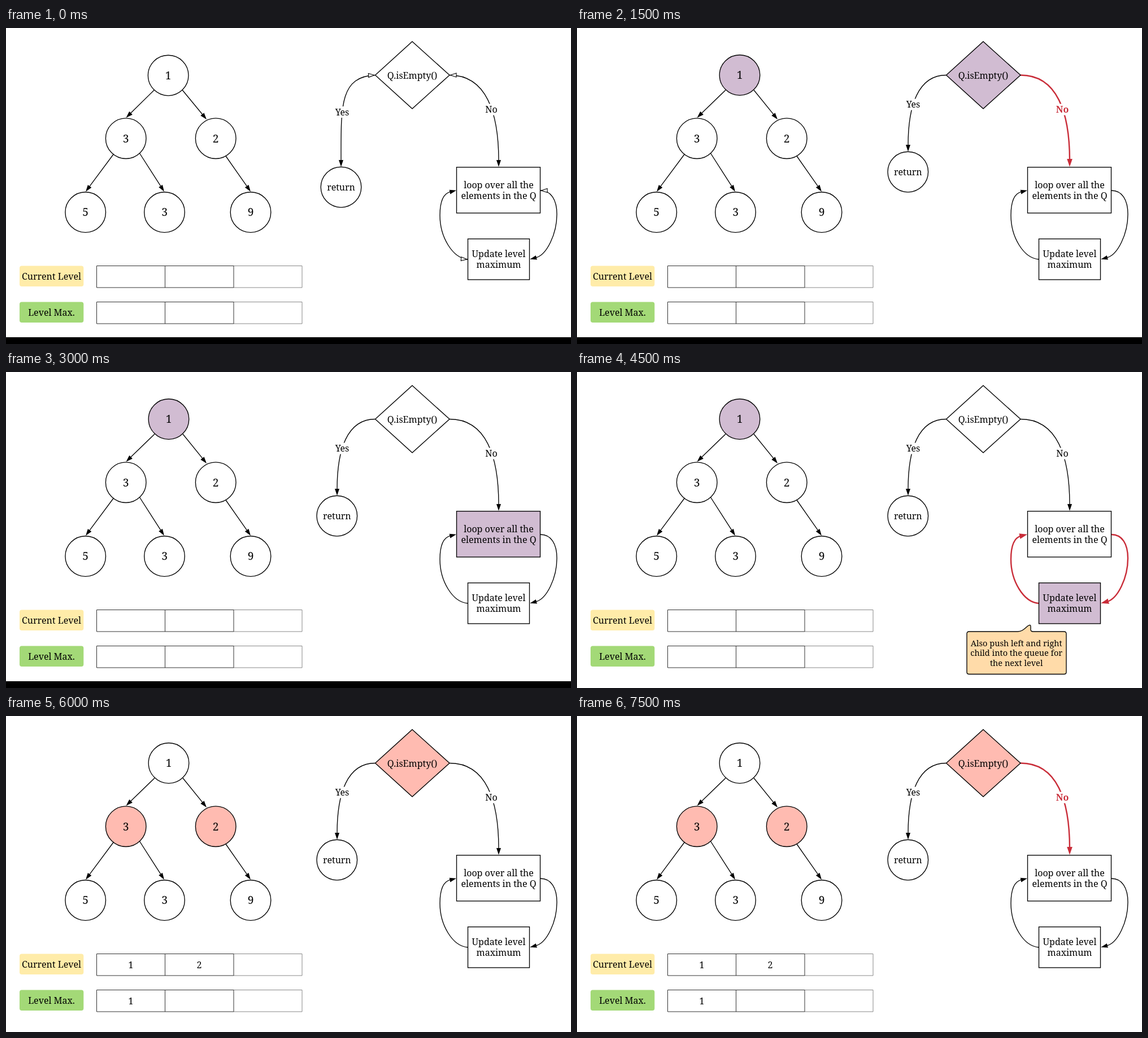
Animation, 1000 px wide and 560 px high, one loop 8000 ms. Source, as an HTML page:

```html
<!DOCTYPE html>
<html lang="en">
<head>
<meta charset="utf-8">
<title>Level maximum of a binary tree</title>
<style>
html, body { margin: 0; width: 100%; height: 100%; overflow: hidden; background: #fff; }
svg { display: block; width: 100%; height: 100%; }
text { font-family: "Noto Serif", "DejaVu Serif", serif; text-anchor: middle; }
.line { stroke: #000; stroke-width: 1.35; }
.hot { stroke: #c92d39; stroke-width: 2.4; }
</style>
</head>
<body>
<svg viewBox="0 0 1000 560">
  <defs>
    <marker id="tip" markerUnits="userSpaceOnUse" markerWidth="14" markerHeight="10" refX="1" refY="5" orient="auto">
      <path d="M0 1L12 5L0 9Z"/>
    </marker>
    <marker id="hotTip" markerUnits="userSpaceOnUse" markerWidth="16" markerHeight="12" refX="3" refY="6" orient="auto">
      <path d="M0 1.2L14 6L0 10.8Z" fill="#c92d39"/>
    </marker>
    <marker id="openTip" markerUnits="userSpaceOnUse" markerWidth="16" markerHeight="12" refX="14" refY="6" orient="auto-start-reverse">
      <path d="M2 2.6L12.5 6L2 9.4Z" fill="#fff" stroke="#000" stroke-width="1.1"/>
    </marker>
  </defs>
  <g id="scene"></g>
</svg>
<script>
const LOOP = 8000, STEP = 1500;
const WHITE = "#fff", PURPLE = "#d1bcd2", PINK = "#ffbbb1", RED = "#c92d39";

// What is highlighted during each step
const steps = [
  { intro: true, bar: true },
  { root: PURPLE, test: PURPLE, no: true, bar: true },
  { root: PURPLE, loop: PURPLE, bar: true },
  { root: PURPLE, update: PURPLE, cycle: true, note: true },
  { level: PINK, test: PINK, filled: true },
  { level: PINK, test: PINK, filled: true, no: true }
];

const text = (s, x, y, size = 16, extra = "") =>
  `<text x="${x}" y="${y + size * 0.357}" font-size="${size}" ${extra}>${s}</text>`;

const node = (label, x, y, fill = WHITE, size = 19.2) =>
  `<circle class="line" cx="${x}" cy="${y}" r="35.8" fill="${fill}"/>` + text(label, x, y, size);

const box = (x, y, w, h, fill = WHITE) =>
  `<rect class="line" x="${x}" y="${y}" width="${w}" height="${h}" fill="${fill}"/>`;

const link = (d, hot, open) =>
  `<path class="${hot ? "hot" : "line"}" d="${d}" fill="none" marker-end="url(#${hot ? "hotTip" : "tip"})"` +
  `${open ? ' marker-start="url(#openTip)"' : ""}/>`;

function edge(x1, y1, x2, y2) {
  const k = 1 - 11 / Math.hypot(x2 - x1, y2 - y1);
  return link(`M${x1} ${y1}L${x1 + (x2 - x1) * k} ${y1 + (y2 - y1) * k}`);
}

const linkLabel = (s, x, y, hot) =>
  `<rect x="${x - 13}" y="${y - 10}" width="26" height="20" fill="#fff"/>` +
  text(s, x, y, 16, hot ? `fill="${RED}" font-weight="700"` : "");

function tree(s) {
  const x = s.intro ? 287.2 : 288, y = s.intro ? 84 : 83.5;
  return edge(x - 25, 110, 212.5, 159) + edge(x + 25, 110, 355, 162) +
    edge(190, 224, 141, 290) + edge(236.5, 222, 280, 290) + edge(389, 227, 433, 290) +
    node(1, x, y, s.root) +
    node(3, 212.2, 195.7, s.level) + node(2, 371.2, 195.7, s.level) +
    node(5, 140.7, 326.5) + node(3, 280.5, 326.5) + node(9, 433, 326.5);
}

function row(label, color, y, values) {
  let out = `<rect x="24" y="${y}" width="113.3" height="36.5" rx="4" fill="${color}"/>` + text(label, 80.5, y + 18.3);
  out += `<g fill="none" stroke-width="1"><path stroke="#888" d="M403 ${y}H524V${y + 38.5}H403"/>` +
    `<path stroke="#333" d="M403 ${y}H160.5V${y + 38.5}H403V${y}M281.5 ${y}v38.5"/></g>`;
  return out + values.map((v, i) => text(v, 221 + 121 * i, y + 19.3)).join("");
}

function flow(s) {
  const intro = s.intro;
  const yes = intro ? "M653.5 83.5C590 86 593 140 593 235" : "M653.5 83.5C603 83.5 586 139 586 208";
  return link(yes, false, intro) + linkLabel("Yes", 595, intro ? 149 : 135.5) +
    link("M785 83.5C850 83.5 872 150 872 235", s.no, intro) + linkLabel("No", 859, 144.5, s.no) +
    `<path class="line" d="M719 24L785 83.5L719 143L653.5 83.5Z" fill="${s.test || WHITE}"/>` +
    text("Q.isEmpty()", 719, 84) +
    node("return", intro ? 593 : 585.8, intro ? 282 : 255, WHITE, 16) +
    link("M946 288C965 288 975 305 975 330C975 365 957 402 938 407", s.cycle, intro) +
    link("M817.5 410C790 408 768 370 768 332C768 305 775 293 786.3 290.3", s.cycle, intro) +
    box(797.5, 246.7, 148, 81.2, s.loop) +
    text("loop over all the", 872, 278) + text("elements in the Q", 872, 297) +
    box(817.5, 373.7, 109, 72.3, s.update) +
    text("Update level", 872, 400.7) + text("maximum", 872, 419.5);
}

const note = () =>
  `<path class="line" fill="#ffdba9" d="M694 460H780C788 460 792 455 798 450Q803 446.5 803 451V456
    Q803 460 807 460H862Q866 460 866 464V531.5Q866 535.5 862 535.5H694Q690 535.5 690 531.5V464Q690 460 694 460Z"/>` +
  ["Also push left and right", "child into the queue for", "the next level"]
    .map((s, i) => text(s, 777.7, 480.7 + 17.4 * i, 14.55)).join("");

const scene = document.getElementById("scene");
let shown = -1;

function draw(time) {
  const i = Math.floor((time % LOOP) / STEP);
  if (i === shown) return;
  shown = i;
  const s = steps[i];
  scene.innerHTML = tree(s) + flow(s) +
    row("Current Level", "#ffeca9", 421.5, s.filled ? [1, 2] : []) +
    row("Level Max.", "#a3d977", 485.5, s.filled ? [1] : []) +
    (s.note ? note() : "") +
    (s.bar ? '<rect y="548" width="1000" height="12"/>' : "");
}

const start = performance.now();
function tick() {
  draw(performance.now() - start);
  requestAnimationFrame(tick);
}
tick();
</script>
</body>
</html>
```
